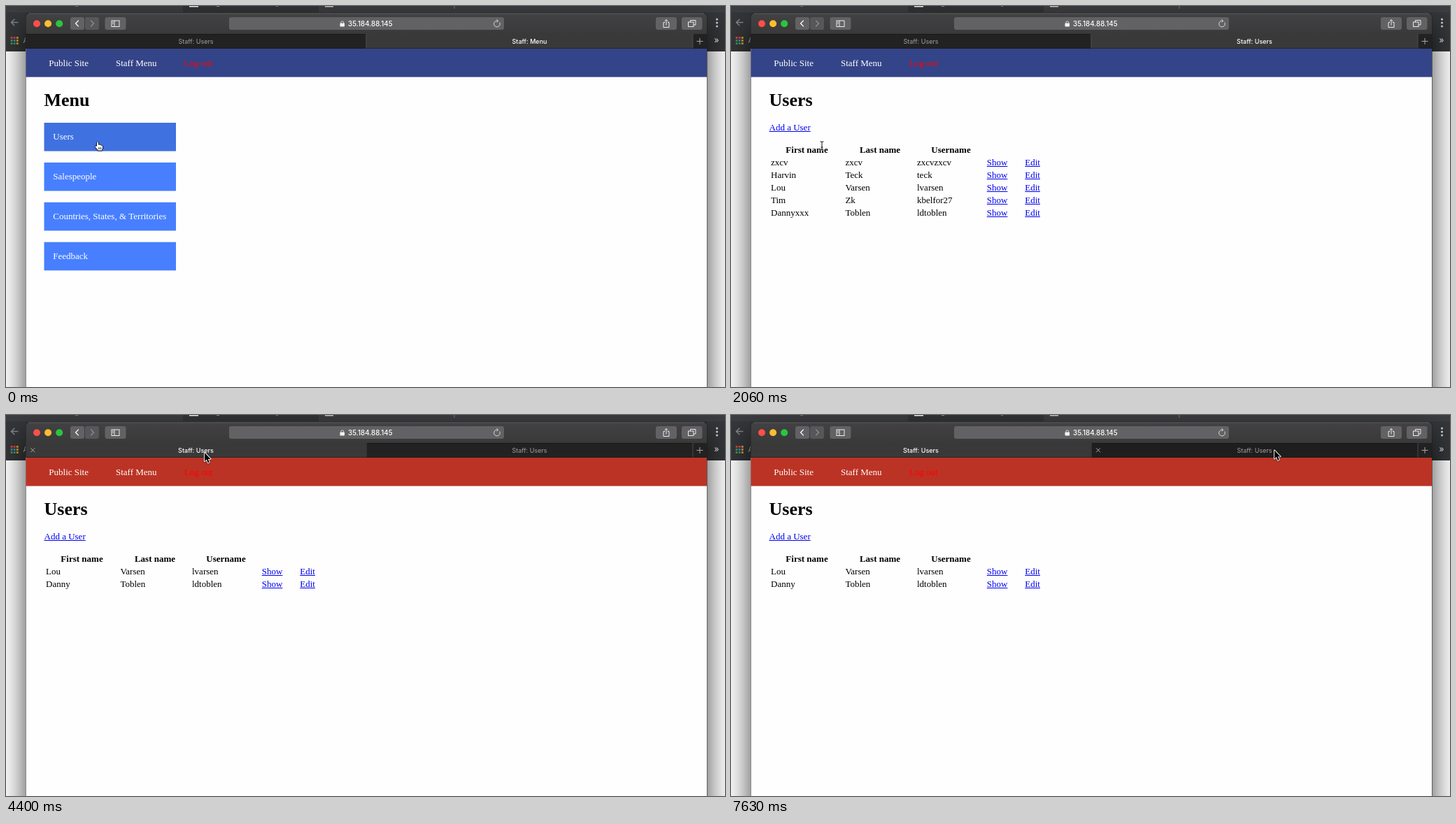
An HTML page with a canvas that plays this animation: 1028 by 545 pixels, repeating every 8 s.

```html
<!DOCTYPE html>
<html lang="en">
<head>
<meta charset="utf-8">
<title>Staff area</title>
<style>
  html, body { margin: 0; width: 100%; height: 100%; overflow: hidden; background: #fff; }
  canvas { display: block; width: 1028px; height: 545px; }
</style>
</head>
<body>
<canvas id="stage" width="1028" height="545"></canvas>
<script>
const ctx = document.getElementById('stage').getContext('2d');
const LOOP = 8000;
const SERIF = '"Liberation Serif", "Times New Roman", serif';
const SANS = 'Inter, Roboto, sans-serif';
const LEFT = 28.5, RIGHT = 1002, SPLIT = 514.5, PLUS = 982;

const LOAD_START = 150, COMMIT = 440, LOAD_END = 880, SWITCH = 4400;

// time, pointer kind, x, y
const POINTER = [
  [0, 'hand', 127, 194], [440, 'arrow', 129.5, 193],
  [1770, 'arrow', 129.5, 195], [1920, 'beam', 130, 199], [2060, 'beam', 130, 200],
  [2210, 'beam', 130, 208], [2350, 'beam', 131, 224], [2500, 'beam', 132, 244],
  [2645, 'beam', 132, 260], [2790, 'beam', 132, 270],
  [2930, 'beam', 132, 280], [3075, 'beam', 133, 289], [3220, 'beam', 138, 284],
  [3370, 'beam', 152, 260], [3515, 'arrow', 184, 212], [3660, 'arrow', 226, 156],
  [3810, 'arrow', 264, 108], [3960, 'hand', 288, 77],
  [4100, 'arrow', 287, 60], [4250, 'arrow', 284, 54],
  [4690, 'arrow', 283, 66], [4835, 'arrow', 258, 112], [4980, 'arrow', 180, 186],
  [5120, 'beam', 88, 257], [5270, 'beam', 69, 249],
  [5720, 'beam', 73, 242], [5865, 'arrow', 140, 214], [6010, 'arrow', 310, 158],
  [6160, 'arrow', 510, 100], [6300, 'arrow', 680, 50], [6450, 'arrow', 772, 22],
  [6590, 'arrow', 789, 31], [6740, 'arrow', 790, 49],
  [6880, 'arrow', 776.5, 50], [7630, 'arrow', 777, 50.5]
];
const PROGRESS = [
  [0, 0], [150, .03], [290, .09], [440, .125], [590, .4], [730, .76], [880, 1], [1170, 0]
];

const ALL_USERS = [
  ['zxcv', 'zxcv', 'zxcvzxcv'],
  ['Harvin', 'Teck', 'teck'],
  ['Lou', 'Varsen', 'lvarsen'],
  ['Tim', 'Zk', 'kbelfor27'],
  ['Dannyxxx', 'Toblen', 'ldtoblen']
];
const FEW_USERS = [ALL_USERS[2], ['Danny', 'Toblen', 'ldtoblen']];
const MENU = ['Users', 'Salespeople', 'Countries, States, & Territories', 'Feedback'];

function keyAt(keys, t) {
  let found = keys[0];
  for (const key of keys) if (key[0] <= t) found = key;
  return found;
}

function rect(x, y, w, h, fill) {
  ctx.fillStyle = fill;
  ctx.fillRect(x, y, w, h);
}

function round(x, y, w, h, r, fill) {
  ctx.beginPath();
  ctx.roundRect(x, y, w, h, r);
  ctx.fillStyle = fill;
  ctx.fill();
}

function dot(x, y, r, fill) {
  ctx.beginPath();
  ctx.arc(x, y, r, 0, Math.PI * 2);
  ctx.fillStyle = fill;
  ctx.fill();
}

function line(color, width, ...strokes) {
  ctx.beginPath();
  for (const pts of strokes) {
    for (let i = 0; i < pts.length; i += 2) {
      ctx[i ? 'lineTo' : 'moveTo'](pts[i], pts[i + 1]);
    }
  }
  ctx.strokeStyle = color;
  ctx.lineWidth = width;
  ctx.stroke();
}

function text(str, x, y, font, fill, align = 'left') {
  ctx.font = font;
  ctx.fillStyle = fill;
  ctx.textAlign = align;
  ctx.fillText(str, x, y);
}

const serif = (str, x, y, fill = '#000', weight = '', size = 13, align) =>
  text(str, x, y, `${weight} ${size}px ${SERIF}`, fill, align);

function link(str, x, y) {
  serif(str, x, y, '#0000ee');
  rect(x, y + 1, ctx.measureText(str).width, 1, '#0000ee');
}

function cross(x, y, r, color, width = 1) {
  line(color, width, [x - r, y - r, x + r, y + r], [x + r, y - r, x - r, y + r]);
}

function drawBackdrop() {
  rect(0, 0, 1028, 545, '#fff');
  rect(0, 0, 1028, 10, '#3c3d40');
  rect(253, 0, 194, 10, '#323336');
  rect(0, 9, 1028, 56, '#353639');
  rect(262, 0, 13, 1.5, '#f2f2f2');
  rect(456, 0, 12, 1.5, '#c9c9ca');
  rect(99, 0, 4, 1, '#77787a');
  rect(301, 0, 4, 1, '#8c8d8f');
  rect(386, 0, 3, 1, '#77787a');
  rect(640.5, 0, 1, 4, '#77787a');

  line('#85868a', 1.4, [17.5, 23.5, 7.5, 23.5], [12.3, 18.7, 7.5, 23.5, 12.3, 28.3]);
  const tones = ['#d9493c', '#d9493c', '#d9a72f', '#3f9d57', '#4a80d8', '#d9a72f',
    '#3f9d57', '#3f9d57', '#d9a72f'];
  tones.forEach((tone, i) => rect(6.7 + i % 3 * 4.1, 44 + Math.floor(i / 3) * 4.1, 2.8, 2.8, tone));
  text('A', 24.6, 53, `10px ${SANS}`, '#b9babd');
  for (let i = 0; i < 3; i++) dot(1016.5, 19 + i * 5, 1.5, '#d4d5d7');
  text('»', 1016, 53, `500 12px ${SANS}`, '#e0e0e2', 'center');
}

function drawFrame() {
  ctx.save();
  ctx.shadowColor = 'rgba(0,0,0,.75)';
  ctx.shadowBlur = 40;
  ctx.shadowOffsetY = 18;
  round(LEFT - .5, 10, RIGHT - LEFT + 1, 640, 5, '#1c1c1d');
  ctx.restore();
  const bar = ctx.createLinearGradient(0, 10, 0, 41);
  bar.addColorStop(0, '#424143');
  bar.addColorStop(1, '#39393a');
  round(LEFT, 10.5, RIGHT - LEFT, 31, [5, 5, 0, 0], bar);
  rect(LEFT + 4, 10.5, RIGHT - LEFT - 8, .8, '#666667');
}

function drawToolbar(t) {
  const loading = t >= LOAD_START && t < LOAD_END;
  const button = '#626163';
  ['#fc4f4a', '#fdbd2f', '#2ac640'].forEach((c, i) => dot(44 + i * 16.1, 25.2, 5, c));

  round(92, 16, 20, 18, 3, button);
  round(113, 16, 20, 18, 3, '#575658');
  line('#fff', 1.3, [103.8, 20.6, 99.6, 25, 103.8, 29.4]);
  line('#929193', 1.3, [121.2, 20.6, 125.4, 25, 121.2, 29.4]);

  round(141.5, 16, 30, 18, 3, button);
  ctx.strokeStyle = '#eee';
  ctx.lineWidth = 1;
  ctx.strokeRect(151, 21, 11, 8.5);
  line('#eee', 1, [155, 21, 155, 29.5]);
  line('#eee', .8, [152, 23.2, 154, 23.2], [152, 25.2, 154, 25.2]);

  round(319, 16, 393, 18, 3, button);
  const amount = keyAt(PROGRESS, t)[1];
  if (amount) {
    ctx.save();
    ctx.beginPath();
    ctx.roundRect(319, 16, 393, 18, 3);
    ctx.clip();
    ctx.globalAlpha = t >= 1020 ? .5 : 1;
    rect(319, 32.4, 393 * amount, 1.6, '#2f9fe0');
    ctx.restore();
  }
  round(477.5, 24.6, 6.6, 5, .8, '#f2f2f2');
  ctx.beginPath();
  ctx.arc(480.8, 23.8, 2, Math.PI, 0);
  ctx.lineTo(482.8, 25);
  ctx.moveTo(478.8, 23.8);
  ctx.lineTo(478.8, 25);
  ctx.strokeStyle = '#f2f2f2';
  ctx.stroke();
  text('35.184.88.145', 520.8, 29.3, `500 9.8px ${SANS}`, '#fff', 'center');

  if (loading) {
    cross(702, 25.2, 4, '#dcdcdc', 1.1);
  } else {
    ctx.beginPath();
    ctx.arc(702, 25.6, 4.3, -.5, Math.PI * 1.55);
    ctx.strokeStyle = '#dcdcdc';
    ctx.lineWidth = 1;
    ctx.stroke();
    line('#dcdcdc', 1, [701.4, 19.2, 703.8, 21.2, 701.6, 23.4]);
  }

  const busy = t >= LOAD_START && t < COMMIT;
  const ink = busy ? '#929193' : '#eee';
  round(929, 16, 30, 18, 3, button);
  line(ink, 1, [942, 23.5, 940, 23.5, 940, 30.5, 948, 30.5, 948, 23.5, 946, 23.5],
    [944, 27.5, 944, 19.6], [941.7, 21.8, 944, 19.5, 946.3, 21.8]);
  round(966, 16, 29.5, 18, 3, button);
  ctx.strokeStyle = '#eee';
  ctx.strokeRect(975.5, 23, 7.5, 6.5);
  line('#eee', 1, [978.5, 23, 978.5, 20.5, 986, 20.5, 986, 27, 983, 27]);
}

function drawTabs(t) {
  const active = t < SWITCH ? 1 : 0;
  const hoverLeft = t >= 4100 && t < 4690;
  const hoverRight = t >= 6880;
  const titles = ['Staff: Users', t < COMMIT ? 'Staff: Menu' : 'Staff: Users'];
  const edges = [LEFT, SPLIT, PLUS];
  rect(LEFT, 40, RIGHT - LEFT, 21, '#222223');
  titles.forEach((title, i) => {
    const on = i === active;
    const x = edges[i], w = edges[i + 1] - x;
    const hover = i ? hoverRight : hoverLeft;
    rect(x, 40, w, 21, on ? '#39393a' : hover ? '#1e1e1f' : '#222223');
    if (!on) rect(x, 40, w, 1, '#171718');
    text(title, i ? 748.5 : 271.5, 53.8, `${on ? 500 : 400} 9px ${SANS}`,
      on ? '#fff' : '#a0a0a1', 'center');
  });
  rect(SPLIT, 40, 1, 21, '#4a4a4b');
  rect(PLUS - .5, 40, 1, 21, '#4a4a4b');
  line('#a8a8a9', 1, [987.5, 50.5, 996.5, 50.5], [992, 46, 992, 55]);
  if (hoverLeft) cross(38.3, 50.3, 3, '#aaaaab');
  if (hoverRight) cross(525, 50.3, 3, '#aaaaab');
  rect(LEFT, 60.5, RIGHT - LEFT, .8, '#151516');
}

function drawMenu() {
  serif('Menu', 54.5, 143, '#000', 'bold', 26);
  MENU.forEach((label, i) => {
    const y = 167 + i * 56.9;
    rect(54.5, y, 188.5, 40.6, i ? '#477fff' : '#3f71e0');
    serif(label, 67.3, y + 24.4, '#fff');
  });
}

function drawUsers(users) {
  serif('Users', 54.5, 143, '#000', 'bold', 26);
  link('Add a User', 54.5, 178);
  [['First name', 108.5], ['Last name', 213], ['Username', 314.5]].forEach(([label, x]) =>
    serif(label, x, 210, '#000', 'bold', 13, 'center'));
  users.forEach((user, row) => {
    const y = Math.round(228 + row * 17.9);
    user.forEach((cell, i) => serif(cell, [57, 163.4, 266][i], y));
    link('Show', 365.8, y);
    link('Edit', 420.3, y);
  });
}

function drawPage(t) {
  const second = t >= SWITCH;
  rect(LEFT, 61, RIGHT - LEFT, 484, '#fefefe');
  rect(LEFT, 61, RIGHT - LEFT, 40.6, second ? '#bb3324' : '#344488');
  serif('Public Site', 61.3, 86, '#fff');
  serif('Staff Menu', 157, 86, '#fff');
  serif('Log out', 254.8, 86, '#ff0008');
  if (t < COMMIT) drawMenu();
  else drawUsers(second ? FEW_USERS : ALL_USERS);
}

const SHAPES = {
  arrow: new Path2D('M0 0V12.2L2.8 9.6 4.8 14.4 6.8 13.5 4.8 8.9H8.6Z'),
  hand: new Path2D('M3 7.2V1.7C3 .2 5 .2 5 1.7V5C5.4 4 7 4.2 7.1 5.3 7.6 4.5 9 4.8 9.1 5.9' +
    'C9.7 5.3 11 5.7 11 6.8V9.2C11 10.6 10 11.2 9.8 12.6H4.6C4.2 11 2 9.4 .8 7.7 0 6.5 1.6 5.6 2.4 6.6Z'),
  beam: new Path2D('M-2.5 -6H-1Q0 -6 0 -5Q0 -6 1 -6H2.5M0 -5V5M-2.5 6H-1Q0 6 0 5Q0 6 1 6H2.5M-1.5 2H1.5')
};

function drawPointer(t) {
  const [, kind, x, y] = keyAt(POINTER, t);
  const shape = SHAPES[kind];
  ctx.save();
  ctx.translate(x, y);
  ctx.lineJoin = 'round';
  if (kind === 'beam') {
    ctx.strokeStyle = 'rgba(255,255,255,.7)';
    ctx.lineWidth = 2.4;
    ctx.stroke(shape);
    ctx.strokeStyle = '#111';
    ctx.lineWidth = 1;
    ctx.stroke(shape);
  } else {
    const arrow = kind === 'arrow';
    ctx.shadowColor = 'rgba(0,0,0,.35)';
    ctx.shadowBlur = 2;
    ctx.shadowOffsetY = 1;
    ctx.strokeStyle = arrow ? '#fff' : '#000';
    ctx.lineWidth = arrow ? 1.8 : 1.3;
    ctx.stroke(shape);
    ctx.shadowColor = 'transparent';
    ctx.fillStyle = arrow ? '#000' : '#fff';
    ctx.fill(shape);
    if (!arrow) line('#000', .7, [5.6, 8.2, 5.6, 11], [7.3, 8.2, 7.3, 11], [9, 8.2, 9, 11]);
  }
  ctx.restore();
}

function draw(t) {
  drawBackdrop();
  drawFrame();
  drawToolbar(t);
  drawTabs(t);
  drawPage(t);
  drawPointer(t);
}

const start = performance.now();
function tick() {
  draw((performance.now() - start) % LOOP);
  requestAnimationFrame(tick);
}
tick();
</script>
</body>
</html>
```
